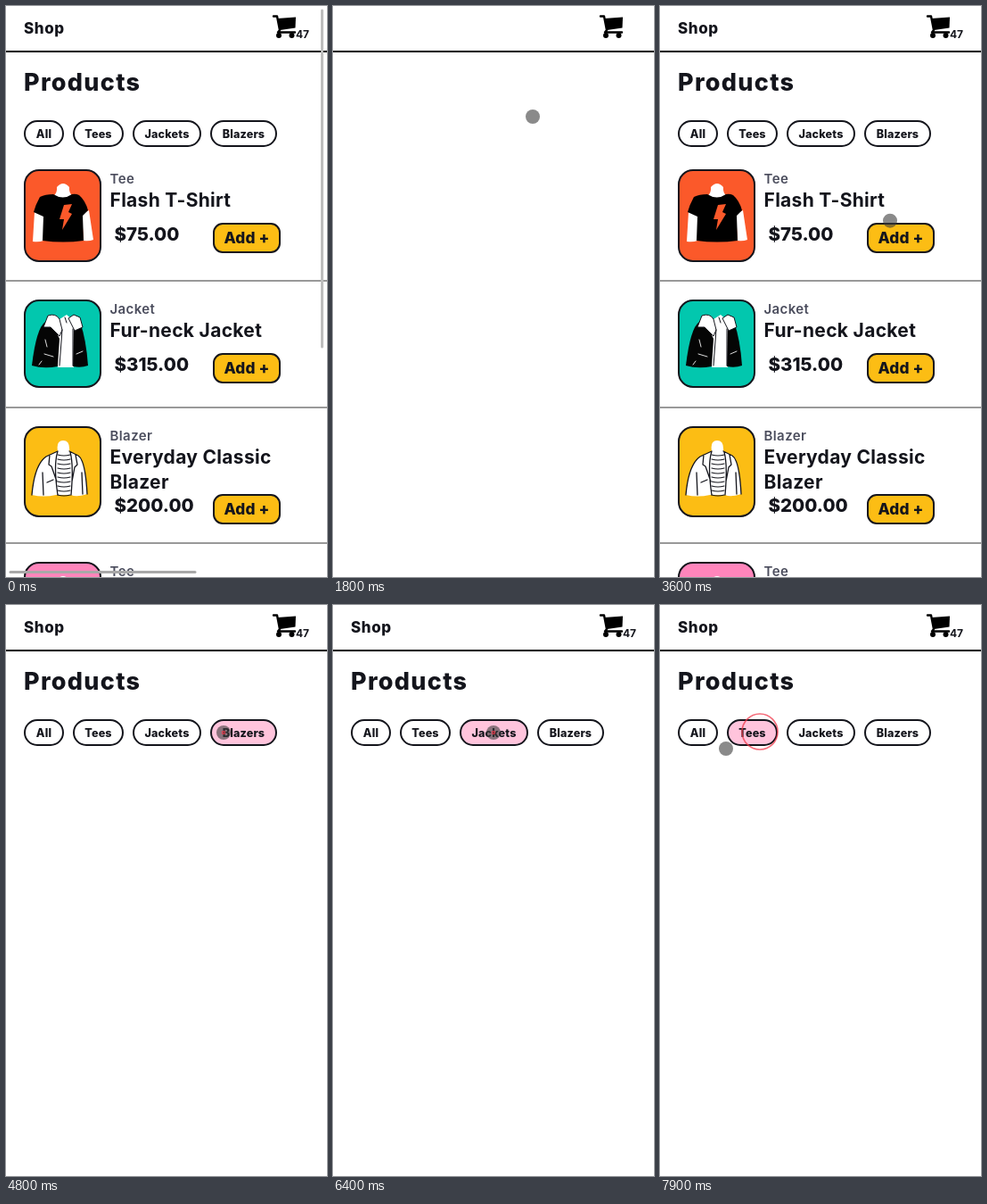
Write an HTML page that moves like this. It is 360 px wide and 640 px high and loops after 8000 ms.

```html
<!DOCTYPE html>
<html lang="en">
<head>
<meta charset="utf-8">
<title>Shop</title>
<style>
html, body { margin: 0; width: 100%; height: 100%; overflow: hidden; background: #fff; }
svg { display: block; width: 360px; height: 640px; font-family: Inter, "Open Sans", sans-serif; }
</style>
</head>
<body>
<svg id="stage" viewBox="0 0 360 640"></svg>
<script>
const LOOP = 8000, INK = '#14151c', YELLOW = '#fcbd14';
const stage = document.getElementById('stage');

const text = (s, x, y, size, weight = 700, spacing = 0, extra = '') =>
  `<text x="${x}" y="${y}" font-size="${size}" font-weight="${weight}" letter-spacing="${spacing}" fill="${INK}" ${extra}>${s}</text>`;
const path = (d, fill, extra = '') => `<path d="${d}" fill="${fill}" ${extra}/>`;
const line = (d, width = 1.5, color = INK) =>
  path(d, 'none', `stroke="${color}" stroke-width="${width}" stroke-linecap="round" stroke-linejoin="round"`);
const box = (x, y, w, h, r, fill) =>
  `<rect x="${x}" y="${y}" width="${w}" height="${h}" rx="${r}" fill="${fill}" stroke="${INK}" stroke-width="2"/>`;

// Garments are drawn relative to the top left corner of their tile.
const tee = bolt =>
  path('M12 48 10 81Q17 82 22 80L24 50ZM65 50 67 80Q73 81 78 79L73 46Z', '#fff') +
  path('M32 31Q38 27 37 20Q44 12 51 20Q50 27 56 31L44 38Z', '#fff') +
  path('M33 28Q24 28 18 31Q13 40 11 48L22 53 21 80Q44 83 67 80L66 52 72 46Q69 35 62 29Q58 27 54 28Q44 35 33 28Z', '#000') +
  path('M45 40 54 39 50 48 54 50 43 68 45 56 40 56Z', bolt);

const jacket = () =>
  path('M34 26 38 76H56L58 26 48 17Z', '#fff') +
  path('M24 25Q14 32 9 74Q22 78 38 75L40 44 30 22Z', '#050505') +
  path('M56 24 63 25Q70 45 72 74Q64 77 55 75Z', '#050505') +
  path('M22 31 27 18Q36 15 40 22L43 34 40 41 30 31Z', '#fff', `stroke="${INK}" stroke-width="1"`) +
  path('M50 21 56 17 63 20 66 31 57 35Z', '#fff', `stroke="${INK}" stroke-width="1"`) +
  line('M43 34 40 74M55 33 55 74M46 20 48 26', 1) +
  line('M24 45 26 53M23 61 33 64M59 61 66 58M20 69 17 73', 1, '#ddd');

const blazer = () =>
  path('M9 77Q12 43 25 34L38 28Q36 16 44 16Q52 16 51 28L61 33Q69 38 71 76Q59 80 53 77H36Q22 80 9 77Z', '#fff') +
  [...Array(10)].map((_, i) => line(`M38 ${32 + i * 5}Q45 ${34 + i * 5} 52 ${32 + i * 5}`, 1.2)).join('') +
  line('M9 77Q12 43 25 34L38 28Q33 43 38 77M51 28 61 33Q69 38 71 76M52 29Q56 43 53 77M29 32 28 43 31 45 37 62M58 32 60 43 57 46 54 62M21 52 22 77M65 52 66 76M26 63 33 60', 1.3);

const PRODUCTS = [
  { tag: 'Tee', title: ['Flash T-Shirt'], price: '$75.00', color: '#fb592a', tile: 103, height: 125, art: () => tee('#fb592a') },
  { tag: 'Jacket', title: ['Fur-neck Jacket'], price: '$315.00', color: '#02c7ae', tile: 98, height: 121, art: jacket },
  { tag: 'Blazer', title: ['Everyday Classic', 'Blazer'], price: '$200.00', color: YELLOW, tile: 101, height: 131, art: blazer },
  { tag: 'Tee', title: ['Star T-Shirt'], price: '$75.00', color: '#ff85bb', tile: 103, height: 125, art: () => tee('#ff85bb') },
];

const FILTERS = [['All', 20, 45], ['Tees', 75, 57], ['Jackets', 142, 77], ['Blazers', 229, 75]];

const CLICKS = [
  { at: 4790, filter: 'Blazers', x: 244, y: 143 },
  { at: 6390, filter: 'Jackets', x: 180, y: 143 },
  { at: 7740, filter: 'Tees', x: 112, y: 142 },
];

// Touch pointer stops: time, x, y
const POINTER = [
  [1790, 224, 124], [3100, 224, 124], [3600, 258, 240], [4000, 262, 502], [4150, 250, 535],
  [4400, 200, 310], [4600, 244, 143], [4800, 244, 143], [5600, 244, 150], [5800, 235, 148],
  [6200, 180, 143], [6600, 180, 143], [7100, 120, 143], [7400, 112, 142], [7750, 112, 142], [7900, 74, 161],
];

const clamp = v => Math.max(0, Math.min(1, v));

function pointerAt(t) {
  const i = POINTER.findIndex(p => p[0] > t);
  if (i < 0) return POINTER.at(-1).slice(1);
  const [t0, x0, y0] = POINTER[i - 1], [t1, x1, y1] = POINTER[i];
  const k = (t - t0) / (t1 - t0);
  return [x0 + (x1 - x0) * k, y0 + (y1 - y0) * k];
}

function row(p, top, loaded) {
  const rowHeight = loaded || p.title.length > 1 ? p.height : 115;
  const lower = top + (p.title.length - 1) * 16;
  const svg = box(21, top + 1, 85, loaded ? p.tile - 1 : 36, 16, p.color) +
    (loaded ? `<g transform="translate(20 ${top})">${p.art()}</g>` : '') +
    text(p.tag, 116.5, top + 16, 15, 600, 0.4, 'style="fill:#4b4d5d"') +
    p.title.map((s, i) => text(s, i && !loaded ? 20 : 116.5, top + 42 + i * 28, 21, 700, 0.3)).join('') +
    text(p.price, loaded ? 121.5 : 25, lower + 80, 20.5, 800, 0) +
    box(233, lower + 61, 74, 32, 10, YELLOW) +
    text('Add +', 270, lower + 83, 17.3, 800, 0.1, 'text-anchor="middle"') +
    line(`M-2 ${top + rowHeight}H362`, 2, '#999');
  return { svg, next: top + rowHeight + 21 };
}

function list(products, loadedCount) {
  let top = 183, svg = '';
  products.forEach((p, i) => {
    const r = row(p, top, i < loadedCount);
    svg += r.svg;
    top = r.next;
  });
  return svg;
}

const cart = () =>
  line('M300 11.5H304L307 27L305 29.5H324', 2.4, '#000') +
  path('M304.5 14 325 12.5 324.5 24.5 307.5 27Z', '#000') +
  '<circle cx="306" cy="33" r="3"/><circle cx="320.5" cy="33" r="3"/>';

const header = showText =>
  line('M-2 51H362', 2, '#000') + cart() +
  (showText ? text('Shop', 20, 31, 17, 800, 0.6) + text('47', 325, 36, 12, 700) +
    text('Products', 20, 95, 27, 800, 1.3) : '');

const filters = active => FILTERS.map(([name, x, w]) =>
  box(x + 1, 129, w - 2, 28, 14, name === active ? '#ffc4dc' : '#fff') +
  text(name, x + w / 2, 147.5, 12.6, 800, 0.15, 'text-anchor="middle"')).join('');

function scrollbars(t) {
  const opacity = clamp(1 - t / 600);
  return `<g opacity="${opacity}">${line('M354.5 5V382', 3, '#bdbdbd')}${line('M5 634.5H212', 3, '#a8a8a8')}</g>`;
}

const arrow = t => {
  const y = 5 - Math.max(0, t - 1200) * 0.12;
  return path(`M126.5 ${y}v23l5-4.5 3.5 8.5 4-1.7-3.6-8.3h8Z`, '#fff', 'stroke="#222" stroke-width="1"');
};

function ripple(t, click) {
  const age = t - click.at;
  if (age > 450) return '';
  const opacity = clamp((450 - age) / 250) * 0.75;
  return `<circle cx="${click.x}" cy="${click.y}" r="${20 * clamp(age / 150)}" fill="none" stroke="#f0384b" stroke-width="1.6" opacity="${opacity}"/>`;
}

function loadedAt(t) {
  if (t < 1490) return 4;
  return [2390, 2590, 2690, 2890].filter(at => t >= at).length;
}

function scene(t) {
  if (t >= 1490 && t < 1790) return '';
  const reloaded = t >= 1790;
  const click = CLICKS.findLast(c => t >= c.at);
  let svg = header(!reloaded || t >= 1990);
  if (!reloaded || t >= 2290) {
    const shown = click ? PRODUCTS.filter(p => p.tag + 's' === click.filter) : PRODUCTS;
    const opacity = click ? clamp((t - click.at - 190) / 1000) : 1;
    svg += filters(click?.filter) + `<g opacity="${opacity}">${list(shown, loadedAt(t))}</g>`;
  }
  if (t < 600) svg += scrollbars(t);
  if (t >= 1190 && t < 1490) svg += arrow(t);
  if (reloaded) {
    const [x, y] = pointerAt(t);
    svg += `<circle cx="${x}" cy="${y}" r="8" fill="#3c3c3c" opacity=".6"/>`;
  }
  if (click) svg += ripple(t, click);
  return svg;
}

function frame() {
  stage.innerHTML = scene(performance.now() % LOOP);
  requestAnimationFrame(frame);
}
frame();
</script>
</body>
</html>
```
